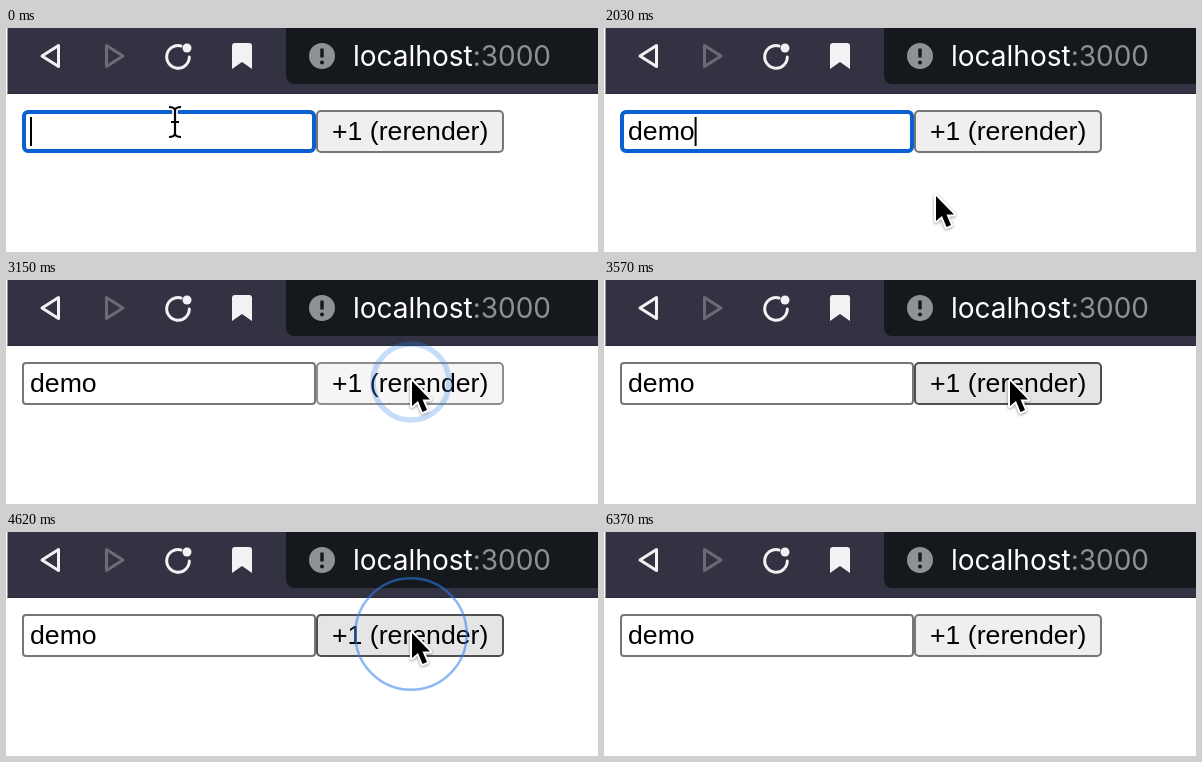
Write an HTML page that moves like this. It is 592 px wide and 224 px high and loops after 6440 ms.

```html
<!DOCTYPE html>
<html lang="en">
<head>
<meta charset="utf-8">
<title>Input and rerender button</title>
<style>
  html, body { margin: 0; width: 100%; height: 100%; overflow: hidden; background: #fff; }
  svg { display: block; }
  .url { font: 28px Inter, sans-serif; }
  .control { font: 26.667px "Liberation Sans", Arial, sans-serif; }
  .icon { fill: none; stroke: #f2f2f4; stroke-width: 3; stroke-linejoin: round; stroke-linecap: round; }
</style>
</head>
<body>
<svg width="592" height="224" viewBox="0 0 592 224">
  <!-- Browser toolbar -->
  <rect x="1.5" width="591" height="66" fill="#323242"/>
  <rect x="1.5" y="65" width="591" height="1" fill="#2a2a37"/>
  <rect x="280" y="-10" width="330" height="66" rx="8" fill="#15181d"/>
  <path class="icon" d="M36 28L52.5 17.5V38.5Z"/>
  <path class="icon" d="M117 28L100.5 17.5V38.5Z" style="stroke:#6b6b78"/>
  <path class="icon" d="M175 18A11.3 11.3 0 1 0 183.3 29"/>
  <circle cx="181" cy="20" r="4.5" fill="#f2f2f4"/>
  <path d="M229 15H243Q246 15 246 18V41L236 34L226 41V18Q226 15 229 15Z" fill="#f2f2f4"/>
  <circle cx="316" cy="28" r="13" fill="#8f9197"/>
  <path d="M316 20.5V29.5" stroke="#15181d" stroke-width="3.4"/>
  <circle cx="316" cy="34.5" r="2" fill="#15181d"/>
  <text class="url" x="347" y="38" fill="#fff">localhost<tspan fill="#8d8f95">:3000</tspan></text>

  <!-- Page controls -->
  <rect id="button" x="311" y="83" width="186" height="41" rx="4" stroke-width="2"/>
  <text class="control" x="326" y="112">+1 (rerender)</text>
  <rect id="field" fill="#fff"/>
  <text id="value" class="control" x="24" y="112"></text>
  <rect id="caret" y="89" width="2" height="29"/>

  <!-- Pointer -->
  <circle id="ring" cx="405" cy="102" fill="none" stroke="#2f80ed"/>
  <g id="arrow" style="filter:drop-shadow(0 1px 1.5px #0006)">
    <path d="M0 0V25L6 20L10.5 31L15 29L10.5 18.5H18Z" stroke="#fff" stroke-width="4" paint-order="stroke" stroke-linejoin="round"/>
  </g>
  <g id="beam" fill="none">
    <path id="beamShape" d="M-6-15Q-1-15 0-12Q1-15 6-15M0-12V12M-6 15Q-1 15 0 12Q1 15 6 15M-4 0H4" stroke="#fff" stroke-width="5"/>
    <use href="#beamShape" style="stroke:#000"/>
    <path d="M-6-15Q-1-15 0-12Q1-15 6-15M0-12V12M-6 15Q-1 15 0 12Q1 15 6 15M-4 0H4" stroke="#000" stroke-width="2.2"/>
  </g>
</svg>
<script>
const LOOP = 6440, STEP = 70;
const WORD = "demo", KEY_INTERVAL = 140, TYPED = WORD.length * KEY_INTERVAL;
const LETTER_WIDTHS = [14.8, 14.8, 22.2, 14.8];
const CLICKS = [3080, 3710, 4340], PRESS = 140, RING_LIFE = 490;

// Pointer stops: time, x, y
const PATH = [
  [0, 169, 94], [560, 172, 102], [910, 172, 102], [1300, 178, 106],
  [1540, 190, 109], [1680, 235, 150], [1820, 272, 192], [1900, 300, 190],
  [2030, 332, 168], [2240, 385, 140], [2450, 402, 112], [2730, 406, 101],
  [6090, 406, 101], [6160, 412, 108], [6230, 440, 143], [6300, 620, 260], [LOOP, 620, 260]
];

const el = Object.fromEntries([...document.querySelectorAll("[id]")].map(e => [e.id, e]));

function set(node, attributes) {
  for (const name in attributes) node.setAttribute(name, attributes[name]);
}

function show(node, visible) {
  node.style.display = visible ? "" : "none";
}

function pointerAt(t) {
  const i = PATH.findIndex(stop => stop[0] > t);
  const [t0, x0, y0] = PATH[i - 1], [t1, x1, y1] = PATH[i];
  const k = (t - t0) / (t1 - t0);
  return [x0 + (x1 - x0) * k, y0 + (y1 - y0) * k];
}

function drawField(t) {
  const focused = t < CLICKS[0];
  const inset = focused ? 2 : 1;
  set(el.field, {
    x: 16 + inset, y: 82 + inset, width: 294 - 2 * inset, height: 43 - 2 * inset,
    rx: focused ? 4 : 3, stroke: focused ? "#0a60d0" : "#767676", "stroke-width": 2 * inset
  });
  const count = Math.min(WORD.length, Math.floor(t / KEY_INTERVAL));
  el.value.textContent = WORD.slice(0, count);
  const width = LETTER_WIDTHS.slice(0, count).reduce((sum, w) => sum + w, 0);
  set(el.caret, { x: 24 + width });
  show(el.caret, focused && (t < TYPED || (t - TYPED) % 1000 < 500));
}

function drawPointer(t) {
  const [x, y] = pointerAt(t);
  const inRow = y > 82 && y < 125;
  const overField = inRow && x > 16 && x < 310;
  const hovered = inRow && x >= 310 && x < 498;
  const pressed = CLICKS.some(c => t >= c && t < c + PRESS);
  show(el.beam, overField);
  show(el.arrow, !overField);
  set(overField ? el.beam : el.arrow, { transform: `translate(${x} ${y})` });
  const [fill, stroke] = pressed ? ["#f5f5f5", "#8d8d8d"]
    : hovered ? ["#e5e5e5", "#4f4f4f"] : ["#efefef", "#767676"];
  set(el.button, { fill, stroke });
}

function drawRing(t) {
  const start = CLICKS.find(c => t >= c && t < c + RING_LIFE);
  show(el.ring, start !== undefined);
  if (start === undefined) return;
  const age = t - start;
  set(el.ring, {
    r: 64 - 38 * Math.exp(-age / 184),
    "stroke-width": Math.max(2, 6.5 - age / 70),
    opacity: age < 280 ? 0.18 + 0.37 * age / 280 : 0.55 * (RING_LIFE - age) / 210
  });
}

function frame(now) {
  const t = Math.floor(now % LOOP / STEP) * STEP;
  drawField(t);
  drawPointer(t);
  drawRing(t);
  requestAnimationFrame(frame);
}
requestAnimationFrame(frame);
</script>
</body>
</html>
```
